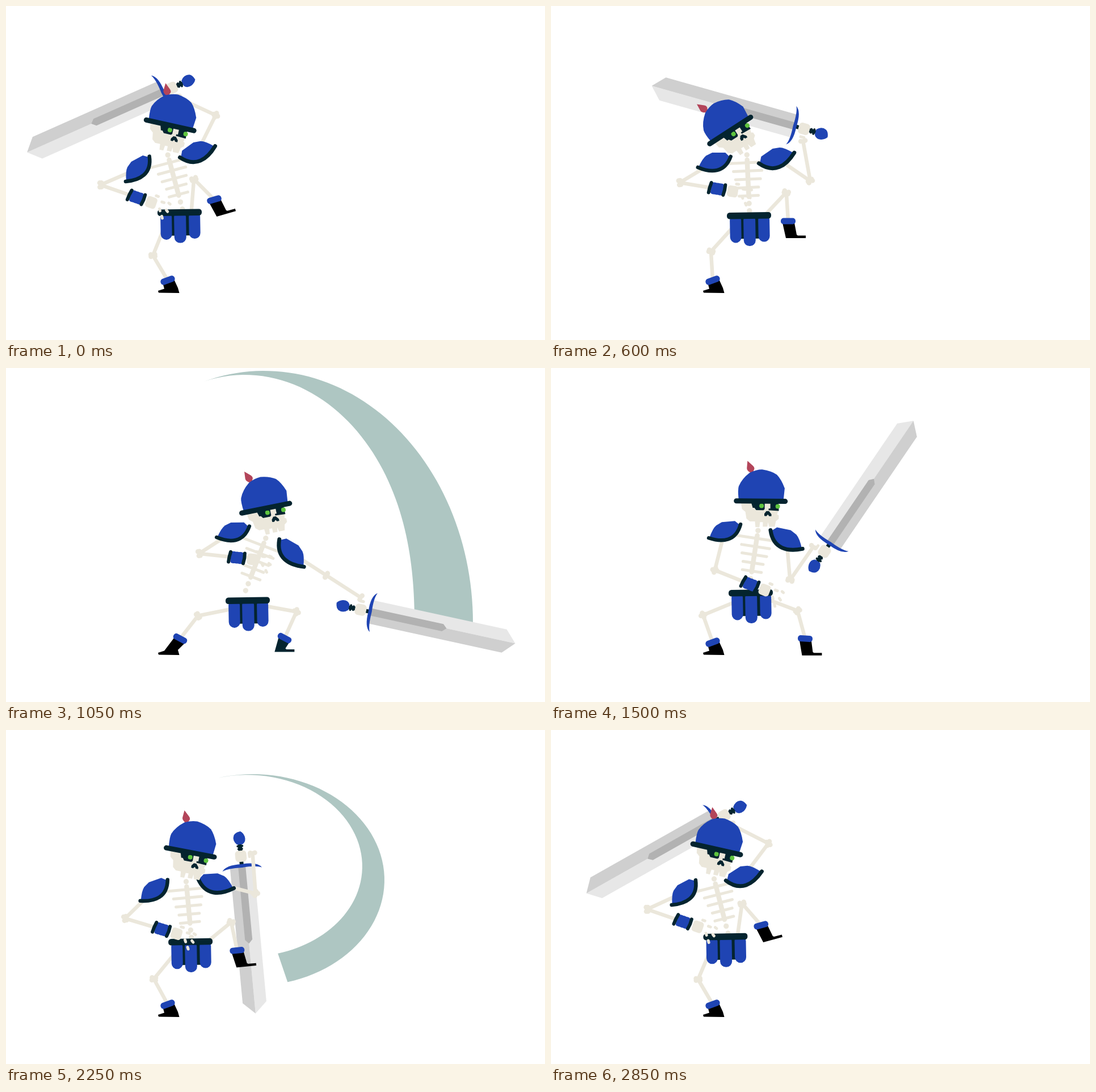
An HTML page with a canvas for the animation above (3000 ms loop, 950 px wide and 590 px high).

```html
<!DOCTYPE html>
<html lang="en">
<head>
<meta charset="utf-8">
<title>Skeleton swordsman</title>
<style>
html, body { margin: 0; width: 100%; height: 100%; overflow: hidden; background: #fff; }
canvas { display: block; width: 950px; height: 590px; }
</style>
</head>
<body>
<canvas id="stage" width="950" height="590"></canvas>
<script>
const ctx = document.getElementById('stage').getContext('2d');
const BONE = '#ebe7db', BLUE = '#1f44b3', DARK = '#04242f', RED = '#b3455a',
      GREEN = '#5fc43f', SLASH = '#aec6c2';
const LOOP = 3000, STEP = 150, STEPS = LOOP / STEP;

const linear = t => t, hold = t => t ** 9;

// Key poses. turn: spine, head, left pad, right pad. The rest of the body follows.
const raise = { step: 0, ease: t => t * t, hip: [306, 364.5], turn: [-15, 12.6, -23.5, -41],
  fist: [230, 338], foot: [367, 342, -16], sword: [292, 145, 156] };
const carry = { step: 4, ease: linear, hip: [349, 370], turn: [-2.6, -33, 5, -40],
  fist: [293, 323], foot: [418, 380, 0], sword: [446, 217, 195.8],
  swing: t => [t ** .2, t * t, t ** 6] };
const strike = { step: 7, ease: hold, hip: [426, 410.5], turn: [21, -11.5, 4.5, 25],
  fist: [407, 335], foot: [491, 477, 28], sword: [625, 427, 12.3] };
const guard = { step: 10, ease: hold, hip: [352, 397], turn: [8.7, .5, 0, 7],
  fist: [351, 382], foot: [448, 478, 3], sword: [482, 324, -55.8] };
const point = { ...guard, step: 13, ease: t => t ** .65,
  foot: [455, 470, 2], sword: [467, 316, -6.6] };
const drop = { step: 16, ease: t => 1 - (1 - t) ** 1.5, hip: [317, 367], turn: [-9.5, 14, -19, -13],
  fist: [251, 343], foot: [393, 365, -8], sword: [398, 195, 112.2] };
const KEYS = [raise, carry, strike, guard, point, drop];

const rad = d => d * Math.PI / 180;

// Third values are angles and take the short way round.
function mix(a, b, t) {
  return a.map((v, i) => {
    const d = i === 2 ? (b[i] - v + 540) % 360 - 180 : b[i] - v;
    return v + d * (t[i] ?? t);
  });
}
// Local point to stage.
function place([ox, oy, r = 0], x, y) {
  const c = Math.cos(rad(r)), s = Math.sin(rad(r));
  return [ox + x * c - y * s, oy + x * s + y * c];
}
// Elbow or knee between a and b, for bones of length m and n.
function joint(a, b, m, n, side) {
  const dx = b[0] - a[0], dy = b[1] - a[1], d = Math.hypot(dx, dy);
  const along = (d * d + m * m - n * n) / (2 * d);
  const out = side * Math.sqrt(Math.max(0, m * m - along * along));
  return [a[0] + (dx * along - dy * out) / d, a[1] + (dy * along + dx * out) / d];
}

function poseAt(step) {
  const k = KEYS.findLastIndex(key => key.step <= step);
  const from = KEYS[k], to = KEYS[(k + 1) % KEYS.length];
  const t = (step - from.step) / ((to.step || STEPS) - from.step), e = from.ease(t);
  const p = {};
  for (const part of ['hip', 'turn', 'fist', 'foot']) p[part] = mix(from[part], to[part], e);
  p.sword = mix(from.sword, to.sword, from.swing ? from.swing(t) : e);

  const [bend, nod, tiltL, tiltR] = p.turn;
  p.chest = [...place([...p.hip, bend * .75], 0, -99 - bend * .3), bend];
  p.head = [...place([...place(p.chest, 0, -9), nod], bend / 2, -52), nod];
  p.padL = [...place(p.chest, -58, 1), tiltL];
  p.padR = [...place(p.chest, 52, -1), tiltR];
  p.wrist = place(p.sword, -4, -21);
  p.elbL = joint(p.padL, p.fist, 71, 67, 1);
  p.elbR = joint(p.padR, p.wrist, 72, 72, 1);
  p.hipL = place(p.hip, -22, 14);
  p.hipR = place(p.hip, 20, 8);
  // The planted foot rolls when the body lunges past it.
  const lunge = Math.max(0, (p.hip[0] - 352) / 74);
  p.cuffL = mix([285, 484.5, -20], [307, 478, 28], lunge);
  p.kneeL = joint(p.hipL, p.cuffL, 67, 51, 1);
  p.kneeR = joint(p.hipR, p.foot, 67, 51, -1);
  p.sole = [...place(p.foot, -4, 30), Math.min(0, p.foot[2])];
  return p;
}

function at([x, y, r = 0], draw, sx = 1, sy = 1) {
  ctx.save();
  ctx.translate(x, y);
  ctx.rotate(rad(r));
  ctx.scale(sx, sy);
  draw();
  ctx.restore();
}
function fill(d, color) {
  ctx.fillStyle = color;
  ctx.fill(new Path2D(d));
}
function line(d, color, width) {
  ctx.strokeStyle = color;
  ctx.lineWidth = width;
  ctx.stroke(new Path2D(d));
}
function dot(x, y, r, color) {
  ctx.fillStyle = color;
  ctx.beginPath();
  ctx.arc(x, y, r, 0, 7);
  ctx.fill();
}
function box(x, y, w, h, r, color) {
  ctx.fillStyle = color;
  ctx.beginPath();
  ctx.roundRect(x, y, w, h, r);
  ctx.fill();
}
const poly = (pts, color) => fill('M' + pts.map(p => p.join(' ')).join('L') + 'Z', color);

// Elliptic sweep, clockwise from just left of the top, widening to its end.
function crescent(cx, cy, rx, ry, end) {
  const outer = [], inner = [];
  for (let i = 0; i <= 60; i++) {
    const t = i / 60, a = rad(-18.5 + (end + 18.5) * t), s = 1 - .28 * t * t * (3 - 2 * t);
    const x = rx * Math.sin(a), y = -ry * Math.cos(a);
    outer.push([cx + x, cy + y]);
    inner.unshift([cx + x * s, cy + y * s]);
  }
  poly([...outer, ...inner], SLASH);
}

function bone(a, b) {
  const dx = b[0] - a[0], dy = b[1] - a[1], n = Math.hypot(dx, dy) || 1;
  line(`M${a[0]} ${a[1]}L${b[0]} ${b[1]}`, BONE, 6.5);
  for (const [x, y] of [a, b])
    for (const s of [-4, 4]) dot(x - dy / n * s, y + dx / n * s, 4.3, BONE);
}
function limb(a, mid, b) {
  bone(a, mid);
  bone(mid, b);
}

function head() {
  fill('M-24-71L-14-62Q-10-58-13-54L-15-48L-20-51Q-25-54-25-58Z', RED);
  fill('M-35 2L-33 14L-27 19L-25 31L-19 36H-10L-9 46H-2L-1 37H4V45H12L13 37L15 45H25L27 35L32 31V25L29 23L32 14V2Z', BONE);
  fill('M-17 2H7V14L5 16H-8L-11 12H-14ZM17 2H31L32 17L14 16V13H17Z', DARK);
  dot(1.5, 8.3, 4, GREEN);
  dot(30, 9, 4, GREEN);
  fill('M6.5 26V22L10 17.5H14.5L19 23V26.5H15L12.8 23.5L10 26.5Z', DARK);
  fill('M-39-2Q-41-20-39-26Q-34-39-20-50Q-8-56 2-56Q18-54 28-47Q36-39 42-23L40-2Z', BLUE);
  line('M-43 0H43', DARK, 9);
}

function chest() {
  line('M0 0V65', BONE, 8.5);
  [35, 25, 22, 18, 17].forEach((w, i) => line(`M${-w} ${5 + i * 14.6}H${w}`, BONE, 5));
  for (const y of [-9, 77, 90]) dot(0, y, 4.7, BONE);
}

function skirt() {
  box(-16, 0, 34, 41, 0, DARK);
  box(-34, -2, 20, 50, 10, BLUE);
  box(-10, -2, 21, 56, 10, BLUE);
  box(16, -2, 20, 49, 10, BLUE);
  box(-39, -5.5, 78, 11.5, 5, DARK);
}

function pad() {
  fill('M-27 12Q-21-5-15-10L-5-16L18-18L28-10Q22 8 12 14Q-6 21-27 12Z', BLUE);
  line('M-28 12C-4 20 20 18 28-12', DARK, 6.5);
}

function hand() {
  for (const x of [-11, -5, 1]) box(x, -10.5, 10, 21, 4, BLUE);
  line('M-12-9Q-14 0-14 9M13-9Q14 0 12 9', DARK, 6);
  box(18, -10, 19, 20, 5, BONE);
  line('M32-14L36-14M45-7L49-7M57-9L60-8M45 6L47 9M57 4L60 6M53 17L55 20', BONE, 5);
}

function sword() {
  fill('M18-21H259L279 0H18Z', '#e7e7e7');
  fill('M18 0H279L259 21H18Z', '#cfcfcf');
  fill('M18-6.5H148L155 0L148 6.5H18Z', '#b2b2b2');
  line('M10 0H16', DARK, 7);
  fill('M23-35Q12-28 14 0Q13 28 24 35Q19 25 20 0Q18-25 23-35Z', BLUE);
  line('M-10 0H-19', DARK, 7);
  line('M-13-3V3M-18-4V4', DARK, 4);
  fill('M-21-5Q-25-12-34-10Q-41-8-44-3Q-43 6-38 9Q-29 13-21 5Z', BLUE);
  box(-10, -10, 20, 20, 6, BONE);
  line('M-4-15L2-15', BONE, 5);
}

const cuff = () => box(-13, -5.5, 26, 11, 5, BLUE);

function boots({ cuffL, foot, sole }, color) {
  poly([place(cuffL, -10, 3), place(cuffL, 11, 3), [303, 498], [305.5, 507], [269, 506.5],
    [268, 503], [279, 499.5]], '#000');
  poly([place(foot, -10, 3), place(foot, 11, 3), place(sole, 19, -6), place(sole, 21, -4.5),
    place(sole, 35, -4.5), place(sole, 35, 0), sole.slice(0, 2)], color);
  at(cuffL, cuff);
  at(foot, cuff);
}

function draw(step) {
  const p = poseAt(step);
  const striking = step >= strike.step && step < guard.step;
  const front = step >= strike.step && step <= point.step;
  const palm = Math.atan2(p.fist[1] - p.elbL[1], p.fist[0] - p.elbL[0]) * 180 / Math.PI;

  ctx.fillStyle = '#fff';
  ctx.fillRect(0, 0, 950, 590);
  ctx.lineCap = ctx.lineJoin = 'round';
  if (striking && step < strike.step + 2) crescent(455, 450, 368, 445, 90);
  if (step > point.step && step < drop.step) crescent(435, 265, 232, 187, p.sword[2] + 80);
  if (!front) at(p.sword, sword);

  limb(p.padR, p.elbR, p.wrist);
  limb(p.hipL, p.kneeL, p.cuffL);
  limb(p.hipR, p.kneeR, p.foot);
  boots(p, striking ? DARK : '#000');
  at(p.chest, chest);
  at([...p.hip, -1], skirt);
  limb(p.padL, p.elbL, p.fist);
  at(p.padL, pad);
  at(p.padR, pad, -1.07, 1.07);
  at(p.head, head);
  at([...p.fist, palm], hand);
  if (front) at(p.sword, sword);
}

const start = performance.now();
let shown = -1;
function tick() {
  const step = Math.floor((performance.now() - start) % LOOP / STEP);
  if (step !== shown) draw(shown = step);
  requestAnimationFrame(tick);
}
tick();
</script>
</body>
</html>
```
